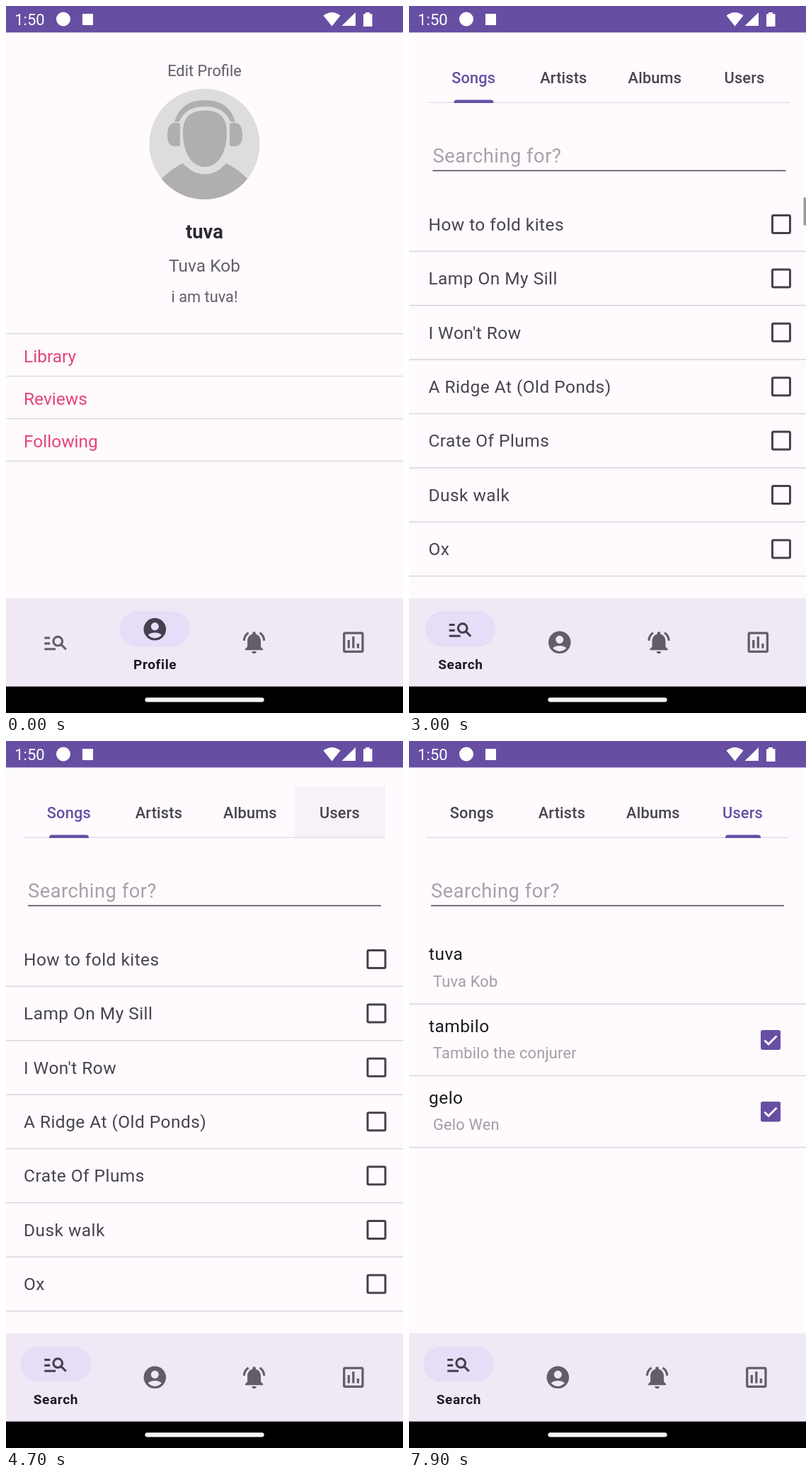
These frames come from a looping animation (561x998 px, 8000 ms). An HTML page:

```html
<!DOCTYPE html>
<html lang="en">
<head>
<meta charset="utf-8">
<title>Music app</title>
<style>
html, body { margin: 0; width: 100%; height: 100%; overflow: hidden; background: #fffafe; }
svg { display: block; width: 100vw; height: 100vh; font-family: Roboto, sans-serif; }
</style>
</head>
<body>
<svg id="stage" viewBox="0 0 561 998"></svg>
<script>
const LOOP = 8000, TICK = 100;
const PURPLE = '#664fa3', PAPER = '#fffafe', BODY = '#48444d', MUTED = '#625e67', DARK = '#463f4e';

// Markup helpers
const rect = (x, y, w, h, fill, extra = '') =>
  `<rect x="${x}" y="${y}" width="${w}" height="${h}" fill="${fill}" ${extra}/>`;
const text = (x, y, size, fill, str, extra = '') =>
  `<text x="${x}" y="${y}" font-size="${size}" fill="${fill}" ${extra}>${str}</text>`;
const centred = (y, size, fill, str, extra = '') =>
  text(280.5, y, size, fill, str, 'text-anchor="middle" ' + extra);
const path = (d, extra = '') => `<path d="${d}" ${extra}/>`;
const rule = (y, fill = '#dad6dc') => rect(-60, y - .75, 681, 1.5, fill);
const group = (id, content, extra = '') => `<g id="${id}" ${extra}>${content}</g>`;

// Navigation bar
const ICONS = [
  path('M2 7h5v2H2zM2 12h5v2H2zM2 17h10v2H2z') +
    '<circle cx="14" cy="11" r="4" fill="none" stroke="currentColor" stroke-width="2"/>' +
    path('M16.8 13.8l4.5 4.5', 'stroke="currentColor" stroke-width="2"'),
  path('M12 2a10 10 0 1 0 0 20a10 10 0 1 0 0-20zM12 6a3.5 3.5 0 1 1 0 7a3.5 3.5 0 1 1 0-7z' +
    'M12 20c-2 0-4.4-.8-6.1-2.9a10 10 0 0 1 12.2 0C16.4 19.200 14 20 12 20z', 'fill-rule="evenodd"'),
  path('M18 11c0-3.1-1.6-5.6-4.5-6.3V4a1.5 1.5 0 0 0-3 0v.7C7.6 5.4 6 7.9 6 11v5l-2 2v1h16v-1l-2-2zM10 20h4a2 2 0 0 1-4 0z') +
    path('M6.9 3.4A9 9 0 0 0 3 10.5M17.1 3.4A9 9 0 0 1 21 10.5', 'fill="none" stroke="currentColor" stroke-width="2"'),
  '<rect x="4" y="4" width="16" height="16" rx="1" fill="none" stroke="currentColor" stroke-width="2"/>' +
    path('M7 10h2v7H7zM11 7h2v10h-2zM15 13h2v4h-2z')
];
const itemX = i => 70.1 + i * 140.25;

function nav(name, active, label) {
  const icons = ICONS.map((icon, i) => {
    const on = i === active, scale = i === 3 ? 1.64 : 1.58;
    return group(name + 'Icon' + i, icon, `fill="currentColor" color="${on ? DARK : MUTED}"
      transform="translate(${itemX(i)} ${on ? 879.8 : 898.3}) scale(${scale}) translate(-12 -12)"`);
  });
  const x = itemX(active);
  return rect(x - 49.7, 854.5, 99.4, 50, '#e7ddf8', 'rx="25"') + icons.join('') +
    text(x + .3, 935.8, 19.1, '#1c1b1f', label,
      `id="${name}Label" font-weight="700" letter-spacing=".6" text-anchor="middle"`);
}
const page = content => rect(-60, 37, 681, 800, PAPER) + rect(-60, 836, 681, 125, '#f0e9f5') + content;

// Profile page
const cup = 'M243 165H237Q228 167 228 182T237 198H243Q246 198 246 195V168Q246 165 243 165Z';
const avatar = '<circle cx="280.5" cy="195" r="78" fill="#dddcde"/><g fill="#b0aeb1">' +
  path('M238 164Q246 133 281 133T324 164L317 163Q308 142 281 142T245 163Z') +
  path(cup) + path(cup, 'transform="translate(562) scale(-1 1)"') +
  path('M250 178C250 155 263 147.5 281 147.5S312 155 312 178C312 208 299 227 281 227S250 208 250 178Z') +
  path('M219.8 244Q233 230 250 222Q264 237.5 281 237.5T311 222Q328 230 341.2 244A78 78 0 0 1 219.8 244Z') + '</g>';
const menu = ['Library', 'Reviews', 'Following'].map((s, i) =>
  text(25, 502.5 + i * 60, 24.5, '#e5437d', s)).join('');
const profile = centred(98.5, 21.8, MUTED, 'Edit Profile') + avatar +
  centred(328, 27.3, '#2c2a30', 'tuva', 'font-weight="700"') +
  centred(375, 24.5, MUTED, 'Tuva Kob') +
  centred(418, 21.8, MUTED, 'i am tuva!') +
  [0, 1, 2, 3].map(i => rule(462.5 + i * 60, '#dcdce0')).join('') + menu;

// Search page
const TABS = [['Songs', 88.8], ['Artists', 215.9], ['Albums', 344.9], ['Users', 471.5]];
const SONGS = ['How to fold kites', 'Lamp On My Sill', "I Won't Row", 'A Ridge At (Old Ponds)',
  'Crate Of Plums', 'Dusk walk', 'Ox'];
const USERS = [['tuva', 'Tuva Kob'], ['tambilo', 'Tambilo the conjurer'], ['gelo', 'Gelo Wen']];
const box = (x, y) =>
  rect(x - 12.5, y - 12.5, 25, 25, 'none', 'rx="1.5" stroke="#45414b" stroke-width="3"');
const tick = (x, y, id) => group(id,
  rect(x - 14, y - 14, 28, 28, PURPLE, 'rx="3"') +
  path(`M${x - 8.5} ${y + .5}l5.5 5.5l11.5-11.5`,
    'fill="none" stroke="#fff" stroke-width="2.8" pathLength="1" stroke-dasharray="1 2"'));

const tabs = TABS.map(([label, x], i) => text(x, 108.5, 21.8, BODY, label,
  `id="tab${i}" font-weight="500" letter-spacing=".15" text-anchor="middle"`)).join('');
const songs = SONGS.map((s, i) => {
  const y = 308 + i * 76.4;
  return text(25, y + 8.7, 24.5, BODY, s, 'letter-spacing=".44"') + box(523.5, y) + rule(y + 38.3);
}).join('');
const users = USERS.map(([name, full], i) => {
  const y = i * 101.2;
  return text(28, y + 309.3, 24.5, '#1b1a1e', name, 'letter-spacing=".44"') +
    text(34, y + 346.5, 21.8, '#a29ea4', full, 'letter-spacing=".2"') + rule(y + 371.3);
}).join('') + '<circle id="touch" cx="511" cy="523" r="20" fill="#664fa3"/>' +
  tick(511, 422, 'tickA') + box(511, 523.2) + tick(511, 523.2, 'tickB');
const search = rect(408.5, 63.5, 127.5, 73, PURPLE, 'id="tabRipple"') +
  rect(25, 135.6, 511, 1.4, '#e2dde5') + path('', `id="marker" fill="${PURPLE}"`) + tabs +
  text(31, 220.8, 27.3, '#a6a2a8', 'Searching for?', 'letter-spacing=".5"') +
  rect(31, 231.7, 499, 1.5, '#42444a') +
  group('songs', songs) + group('users', users) +
  rect(555, 270.5, 66, 39, '#9c999d', 'id="scrollbar"');

// System bars
const system = rect(0, 0, 561, 37.4, PURPLE) + rect(0, 960.6, 561, 37.4, '#000') +
  rect(196.4, 976.2, 168.3, 6.2, '#f6f3f6', 'rx="3.1"') +
  text(12.2, 27, 22, '#fff', '1:50') +
  '<circle cx="81" cy="18.5" r="10" fill="#fff"/>' + rect(108, 11, 15, 16, '#fff') +
  path('M460.5 28.5L448.5 13.5Q460.5 4.5 472.5 13.5ZM474.5 28H494V9ZM508 9h6v2.300h3.500v17.700h-12.500v-17.700h3z', 'fill="#fff"');

const stage = document.getElementById('stage');
stage.innerHTML =
  group('profilePage', page(profile + nav('p', 1, 'Profile'))) +
  group('leavingPage', page(profile + nav('l', 0, 'Search'))) +
  group('searchPage', page(search + nav('s', 0, 'Search'))) +
  rect(20.4, 873.3, 99.4, 50, PURPLE, 'id="navRipple" rx="25"') + system;

const el = id => document.getElementById(id);
const set = (id, attrs) => { for (const k in attrs) el(id).setAttribute(k, attrs[k]); };
const show = (id, on) => set(id, { display: on ? 'inline' : 'none' });
const span = (t, from, to) => Math.min(1, Math.max(0, (t - from) / (to - from)));
const mix = (a, b, k) => a + (b - a) * k;

// Rises from a to b, then falls back to zero at c
const pulse = (t, a, b, c, peak) => peak * (t < b ? span(t, a, b) : 1 - span(t, b, c));

function bezier(x, xs, ys) {
  const at = (p, u) => {
    const v = 1 - u;
    return v * v * v * p[0] + 3 * v * v * u * p[1] + 3 * v * u * u * p[2] + u * u * u * p[3];
  };
  let lo = 0, hi = 1;
  for (let i = 0; i < 24; i++) {
    const mid = (lo + hi) / 2;
    if (at(xs, mid) < x) lo = mid; else hi = mid;
  }
  return at(ys, lo);
}
// Quick start with a long settle, used for the page change
const settle = k => k < 1 / 6
  ? bezier(k, [0, .05, .1333, 1 / 6], [0, 0, .06, .4])
  : bezier(k, [1 / 6, .2083, .25, 1], [.4, .82, 1, 1]);
const standard = k => bezier(k, [0, .4, .2, 1], [0, 0, 1, 1]);

const PAGE = 2766, TAB = 4750, LIST = 4850, CHECK = 7350;

function render(t) {
  // Press on the first navigation item
  set('pIcon0', { color: t < 1000 ? MUTED : DARK });
  set('pIcon1', { color: t < 1100 ? DARK : MUTED });
  set('pLabel', { fill: t < 1100 ? '#1c1b1f' : BODY });
  set('navRipple', { opacity: pulse(t, 950, 1100, 1300, .07) });

  // Page change
  const slide = settle(span(t, PAGE, PAGE + 450));
  show('profilePage', t < PAGE);
  show('leavingPage', t >= PAGE && t < PAGE + 450);
  set('leavingPage', { transform: `translate(${-56 * slide})` });
  set('searchPage', {
    transform: `translate(${56 * (1 - slide)})`,
    opacity: span(t, PAGE + 50, PAGE + 133)
  });
  set('scrollbar', { opacity: 1 - span(t, 4363, 4613) });

  // Tab change: the leading edge runs ahead of the trailing one
  const k = standard(span(t, TAB, TAB + 300)) * Math.PI / 2;
  const left = mix(61, 447, 1 - Math.cos(k)), right = mix(117, 497, Math.sin(k));
  set('marker', { d: `M${left} 137v-.5q0-4 4-4H${right - 4}q4 0 4 4v.5z` });
  TABS.forEach((_, i) => set('tab' + i, { fill: i === (t < TAB ? 0 : 3) ? PURPLE : BODY }));
  set('tabRipple', { opacity: pulse(t, 4600, 4800, 5200, .1) });
  show('songs', t < LIST);
  show('users', t >= LIST);

  // Third user gets ticked
  set('tickB', {
    opacity: span(t, CHECK, CHECK + 150),
    'stroke-dashoffset': 1 - span(t, CHECK + 50, CHECK + 250)
  });
  set('touch', { opacity: pulse(t, 7250, 7400, 7650, .08) });
}

const start = performance.now();
function play(now) {
  const t = Math.max(0, now - start) % LOOP;
  render(Math.floor(t / TICK) * TICK);
  requestAnimationFrame(play);
}
play(start);
</script>
</body>
</html>
```
